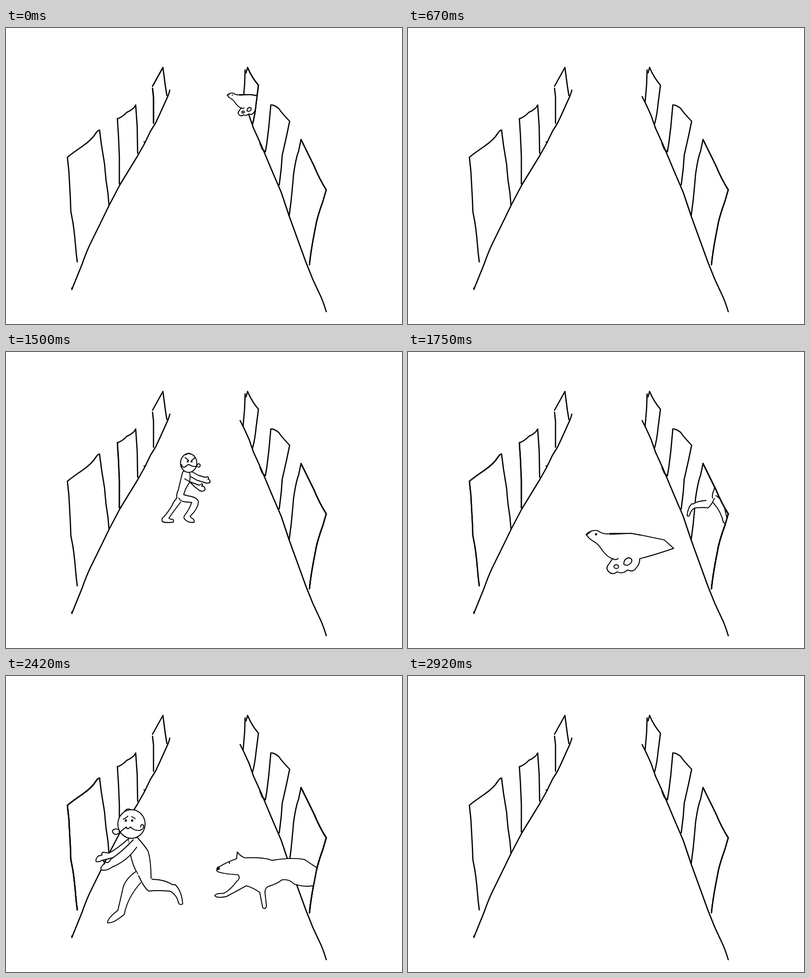
Animation, 800 px wide and 600 px high, one loop 3.16 s. Source, as an HTML page with a canvas:

```html
<!DOCTYPE html>
<html lang="en">
<head>
<meta charset="utf-8">
<title>Corridor chase</title>
<style>
  html, body { margin: 0; width: 100%; height: 100%; overflow: hidden; background: #fff; }
  canvas { display: block; }
</style>
</head>
<body>
<canvas id="stage" width="800" height="600"></canvas>
<script>
const ctx = document.getElementById('stage').getContext('2d');
const LOOP = 3160;
const WALL_WIDTH = 2.5;
const FIGURE_WIDTH = 1.9;
ctx.lineCap = ctx.lineJoin = 'round';

const oval = (x, y, rx, ry = rx) =>
  `M${x - rx} ${y}a${rx} ${ry} 0 1 1 ${2 * rx} 0a${rx} ${ry} 0 1 1 ${-2 * rx} 0Z`;

// Corridor
const walls = [
  'M331 126L328 136L310 176L302 193L292 209L280 234L266 259L230 318L208 360L195 387L170 438Q162 455 154 478L133 530L133 527M279 231L280 232',
  'M473 139L481 155L491 177L500 203L515 236L538 291L556 333L572 381L606 475L620 510L634 540Q640 552 647 575M513 234L518 246L523 250'
];
const innerEdges = [
  'M317 80L322 118L325 137',
  'M225 184Q236 180 244 171Q258 165 262 156L265 200L266 254',
  'M189 207L193 238L199 275L202 308L206 335L208 359',
  'M483 85L482 115L479 150M485 91L488 80',
  'M524 251L527 233L531 200L535 156Q541 155 551 163Q555 170 573 189L567 218L558 258L556 285L552 318',
  'M572 381L576 350Q579 320 581 296Q586 262 591 250L596 226'
];
const nearRightEdge = 'M596 226L622 279Q634 308 647 328L640 352Q628 385 625 405Q616 450 613 480';
const outerEdges = {
  far: 'M298 193L298 140L296 122L297 132M296 118L317 80M488 80Q497 101 510 116L505 155Q503 177 498 195',
  middle: 'M229 316L229 260L227 215L225 184' + nearRightEdge,
  near: 'M144 474L142 458L139 425L137 407L135 393L131 372L130 345L127 290L124 262Q135 253 154 240Q174 226 181 214Q186 206 189 207' + nearRightEdge
};

// Each lane is visible between the outer edges of its two doorways.
const nearRightClip = 'L613 600L613 480Q616 450 625 405Q628 385 640 352L647 328Q634 308 622 279L596 226V0Z';
const laneClips = {
  far: 'M317 0V80L297 118L298 193V240H498V195Q503 177 505 155L510 116Q497 101 488 80V0Z',
  middle: 'M262 0V156L225 184L229 260V600' + nearRightClip,
  near: 'M189 0V207L124 262L127 290L131 372L137 407L144 474V600' + nearRightClip
};

// Figures: solids are white with an outline, lines are only stroked, dots are black.
const bird = {
  solids: [
    'M447 136Q452 131 459 132Q466 137 473 135L495 135L506 137L530 142L540 151Q520 158 504 162Q504 168 500 172Q497 177 491 174Q486 179 480 176Q475 180 471 176Q467 172 471 168L475 162Q470 161 464 153Q460 146 454 143Q450 141 447 136Z',
    'M487 168Q487 162 492 161Q497 162 495 166Q491 171 487 168Z',
    oval(479, 170.5, 2.5, 2)
  ],
  lines: 'M447 137L452 133M472 136L495 135L505 137M475 162Q478 164 481 162',
  dots: oval(457.5, 136, 1.2)
};

const dogTop = 'M273 249Q278 258 291 257Q300 252 308 247Q325 244 352 248Q362 244 388 245Q394 243 398 238L399 246Q412 250 421 255Q427 257 425 261Q418 264 397 265';
const dogFace = oval(408.5, 251, 1) + oval(423.5, 257.5, 2);
const dogStretched = {
  solids: [dogTop + 'Q393 269 399 273Q407 283 416 287Q428 287 428 290Q425 293 413 291Q402 286 386 278Q375 281 368 286L364 304Q360 307 359 302L361 286Q361 281 357 279Q345 276 338 271Q328 270 322 276Q308 280 296 278Q295 284 292 288Q286 290 283 287Q282 284 288 282Q290 278 284 278Q279 283 272 283Q266 281 270 277Q282 276 292 271Q296 267 285 265Q276 263 273 249Z'],
  dots: dogFace
};
const dogGathered = {
  solids: [dogTop + 'Q393 270 390 276Q380 282 372 292Q358 300 356 296Q366 288 366 282Q345 276 338 271Q328 270 322 276Q330 286 344 292Q346 297 338 297Q318 290 306 281Q296 276 291 268Q276 263 273 249Z'],
  dots: dogFace
};

const chaser = {
  legs: [
    'M345 296Q338 304 335 312Q327 325 319 334Q313 338 316 344Q324 347 338 345Q340 338 333 339L329 337Q337 325 353 304',
    'M349 296Q352 303 364 304L375 305Q371 318 361 331Q357 336 363 341Q371 347 380 345Q382 340 374 336L372 333Q388 318 389 303Q386 296 375 293Q364 291 359 289'
  ],
  torso: 'M359 289Q362 277 371 264L372 252L370 235L357 243Q352 262 348 280Q344 288 345 296',
  solids: [
    'M376 243L389 250L402 254L407 253Q411 254 408 258Q413 258 412 265L405 266L399 264L386 260L372 252',
    'M361 257L371 263L390 270L396 267Q399 269 395 272Q403 272 402 279Q399 284 391 281L381 273L372 264',
    oval(369, 225, 16.5, 19)
  ],
  lines: 'M364 208Q369 203 373 207M362 214L369 220M382 214L374 221M354 228Q354 235 362 233Q367 228 370 228Q376 233 386 232Q393 236 392 228Q388 224 385 231',
  dots: oval(367, 222, 2) + oval(375, 222, 2) + oval(354.5, 230, 2)
};

const fleer = {
  legs: [
    'M263 396Q238 413 235 436L226 475Q206 490 205 500Q215 503 238 484L239 483Q245 450 272 419',
    'M295 412Q322 413 336 423L342 423Q355 436 357 462Q350 466 348 458Q346 447 335 438L330 436Q305 434 288 436Q278 428 268 405'
  ],
  torso: 'M266 401Q256 385 251 360L247 333L250 322L266 328Q281 345 287 355Q293 375 293 410',
  solids: [
    'M246 331Q225 350 208 359L196 357Q192 360 194 363L186 365Q180 372 182 376Q188 378 193 374L221 367L250 345',
    'M257 332Q236 355 211 372Q207 383 196 374L200 380Q190 386 192 393Q203 396 215 387Q245 375 264 347',
    oval(253.5, 300, 27.5, 29)
  ],
  lines: 'M240 273Q247 267 252 271M237 290Q243 288 246 284M254 285L261 289M227 311Q217 308 215 315Q217 322 223 321Q230 319 233 314L243 306Q244 313 252 306Q258 314 270 313Q280 310 278 303Q273 298 272 306',
  dots: oval(242, 293, 2.4) + oval(255, 293, 2.4)
};

const peeker = {
  solids: [
    'M621 349Q629 362 631 375L660 375V347H641Q636 345 632 338',
    'M616 345L603 367Q591 366 590 369Q590 372 597 371Q587 374 590 377L600 374Q600 386 603 388Q606 386 605 377Q609 375 607 368L628 346',
    oval(615, 322.5, 20, 22)
  ],
  lines: 'M610 301Q614 299 617 301M620 347L606 369M602 318L607 314M615 314L621 316M592 334Q586 333 587 338Q593 342 598 335L609 327Q612 333 616 328Q622 334 630 332Q637 327 632 322Q627 321 628 326',
  dots: oval(607, 321, 1.8) + oval(619, 319, 1.8)
};

// Maps the point (fx, fy) to (tx, ty) with the given scales.
const place = (fx, fy, tx, ty, sx, sy = sx) =>
  new DOMMatrix([sx, 0, 0, sy, tx - sx * fx, ty - sy * fy]);

function mapped(d, matrix) {
  const path = new Path2D();
  path.addPath(new Path2D(d), matrix);
  return path;
}

function drawSolid(d, matrix) {
  const path = mapped(d, matrix);
  ctx.fillStyle = '#fff';
  ctx.fill(path);
  ctx.stroke(path);
}

function drawFigure(figure, matrix) {
  figure.solids.forEach(d => drawSolid(d, matrix));
  if (figure.lines) ctx.stroke(mapped(figure.lines, matrix));
  ctx.fillStyle = '#000';
  ctx.fill(mapped(figure.dots, matrix));
}

// The two men share their leg poses to make a running cycle.
const legSwap = place(268, 404, 349, 296, -0.62, 0.62);
function drawMan(man, matrix, swapLegs) {
  const other = man === chaser ? fleer : chaser;
  const swap = man === chaser ? legSwap : legSwap.inverse();
  const legs = swapLegs ? other.legs : man.legs;
  const legMatrix = swapLegs ? matrix.multiply(swap) : matrix;
  drawSolid(man.torso, matrix);
  legs.forEach(d => drawSolid(d, legMatrix));
  drawFigure(man, matrix);
}

function drawDog(k, matrix) {
  const stretched = k % 3 === 2;
  drawFigure(stretched ? dogStretched : dogGathered, matrix.translate(0, stretched ? 0 : -8));
}

function inLane(name, draw) {
  ctx.save();
  ctx.clip(new Path2D(laneClips[name]));
  ctx.lineWidth = FIGURE_WIDTH;
  draw();
  ctx.restore();
  ctx.stroke(new Path2D(outerEdges[name]));
}

// Twelve drawings per second, on boundaries rounded to 10 ms.
function stepAt(t) {
  let k = 0;
  while (Math.round((k + 1) * 25 / 3) * 10 <= t) k++;
  return k;
}

function drawStep(k) {
  const act = (from, to, lane, draw) => {
    if (k >= from && k <= to) inLane(lane, draw);
  };
  ctx.fillStyle = '#fff';
  ctx.fillRect(0, 0, 800, 600);
  ctx.strokeStyle = '#000';
  ctx.lineWidth = WALL_WIDTH;
  [...walls, ...innerEdges, outerEdges.far, outerEdges.middle, outerEdges.near]
    .forEach(d => ctx.stroke(new Path2D(d)));

  act(0, 3, 'far', () => drawFigure(bird, place(447, 136, 447 - 70 * k, 136, 1)));
  act(4, 7, 'far', () =>
    drawMan(chaser, place(315, 205, 369 - 55 * (k - 7), 106, -0.53, 0.53), k % 2 === 0));

  act(12, 17, 'middle', () => drawDog(k, place(0, 0, 90 * (k - 14), 0, 1)));
  act(16, 21, 'middle', () => drawMan(chaser, place(0, 0, 90 * (k - 18), 0, 1), k % 2 === 1));

  act(19, 24, 'near', () =>
    drawFigure(bird, place(447, 131, 590 - 115 * (k - 19), 360, 1.9)));
  act(25, 25, 'near', () => drawFigure(peeker, new DOMMatrix()));
  act(26, 31, 'near', () => {
    const scale = Math.min(1, 0.73 + 0.27 * (k - 25) / 4);
    drawMan(fleer, place(253, 300, 253 - 90 * (k - 29), 300, scale), k % 2 === 0);
  });
  act(27, 34, 'near', () =>
    drawDog(k, place(426, 257.5, 425 - 90 * (k - 29), 390, -1.51, 1.71)));
}

const start = performance.now();
function frame() {
  drawStep(stepAt((performance.now() - start) % LOOP));
  requestAnimationFrame(frame);
}
frame();
</script>
</body>
</html>
```
